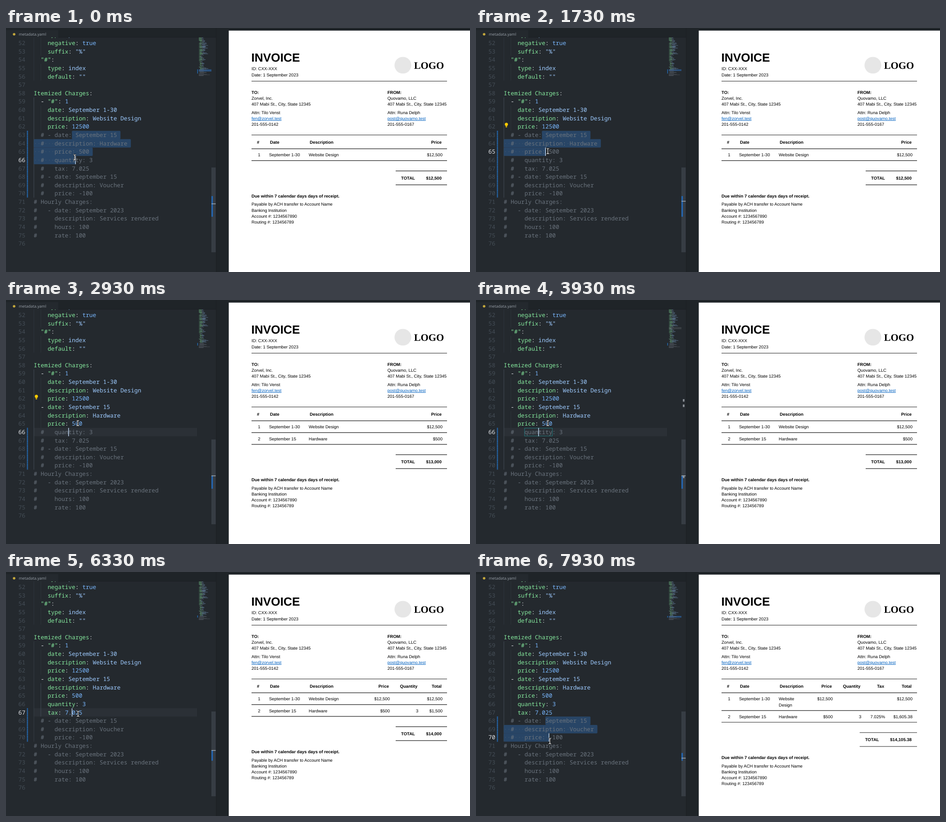
Animation of 1030x544 px, one loop 8000 ms. Source, as an HTML page:

```html
<!DOCTYPE html>
<html lang="en">
<head>
<meta charset="utf-8">
<title>Invoice from YAML</title>
<style>
  html, body { margin: 0; width: 100%; height: 100%; overflow: hidden; background: #24292e; }
  svg { display: block; width: 1030px; height: 544px; }
  text { white-space: pre; text-rendering: geometricPrecision; }
  .code text { font: 500 12.833px "Noto Sans Mono", monospace; }
  .code .tab { font: 8.6px "Noto Sans", sans-serif; fill: #959da5; }
  .page text { font: 9.56px "Liberation Sans", Arial, sans-serif; fill: #000; }
  .page .bold { font-weight: bold; }
  .page .title { font-size: 26.3px; font-weight: bold; }
  .page .logo { font: bold 22.2px "Liberation Serif", serif; }
  .page .link { fill: #0563c1; text-decoration: underline; }
</style>
</head>
<body>
<svg id="stage" viewBox="0 0 1030 544"></svg>
<script>
const LOOP = 8000, LEFT = 61.6, CHAR = 7.7, PITCH = 18.63, FIRST_ROW = 51;
const COLOR = {
  key: '#85e89d', string: '#9ecbff', number: '#79b8ff', plain: '#e1e4e8',
  comment: '#6a737d', dot: '#41566e', guide: '#2f363d', blue: '#2470bd'
};

const SOURCE = `    type: percent
    negative: true
    suffix: "%"
  "#":
    type: index
    default: ""

Itemized Charges:
  - "#": 1
    date: September 1-30
    description: Website Design
    price: 12500
  - date: September 15
    description: Hardware
    price: 500
    quantity: 3
    tax: 7.025
  - date: September 15
    description: Voucher
    price: -100
# Hourly Charges:
#   - date: September 2023
#     description: Services rendered
#     hours: 100
#     rate: 100
`.split('\n');

// time, caret row, caret column, selection anchor row and column
const CARET = [
  [0, 66, 12, 63, 11], [1730, 65, 12, 63, 11], [2400, 65, 10, 63, 9],
  [2870, 66, 10], [4270, 66, 8], [5530, 67, 13], [6330, 67, 11]
];
const DRAG_START = 7470;
const CARET_OFF = [[800, 1270], [2200, 2400], [3400, 3930], [4730, 5200], [6070, 6330], [6800, 7330]];
const MOUSE = [
  [0, 152.5, 288.5], [200, 152, 287.5], [400, 152, 287.5], [530, 154, 284],
  [670, 166, 277], [800, 162, 274], [866, 159.5, 274.5], [5070, 159.5, 274.5],
  [5133, 159.5, 280], [5200, 160, 306], [5266, 160, 316], [7130, 160, 316],
  [7200, 160, 317], [7400, 156, 331], [7530, 156, 333], [7670, 157, 347], [7930, 164, 377]
];

const colX = col => LEFT + col * CHAR;
const rowY = row => 285.1 + (row - 66) * PITCH;
const rulerY = row => 392 + (row - 66) * 5.75;
const mapY = row => 20 + (row - 1) * 1.165;
const between = (t, a, b) => t >= a && t < b;
// value of the last [time, value] step reached
const stepAt = (t, steps) => steps.filter(s => s[0] <= t).pop()[1];

const rect = (x, y, w, h, fill, extra = '') =>
  `<rect x="${x}" y="${y}" width="${w}" height="${h}" fill="${fill}" ${extra}/>`;
const line = (x1, y1, x2, y2, stroke, extra = '') =>
  `<path d="M${x1} ${y1}L${x2} ${y2}" stroke="${stroke}" ${extra}/>`;
const text = (x, y, str, extra = '') => `<text x="${x}" y="${y}" ${extra}>${str}</text>`;
const codeText = (row, col, str, fill) => text(colX(col), rowY(row) + 13.8, str, `fill="${fill}"`);

function tokens(str) {
  if (/^\s*#/.test(str)) {
    const indent = str.search(/#/);
    return [[indent, str.slice(indent), COLOR.comment]];
  }
  const match = str.match(/^(\s*)(- )?([^:]+):\s?(.*)$/);
  if (!match) return [];
  const [, indent, dash = '', key, value] = match;
  const start = indent.length + dash.length, colon = start + key.length;
  const isConst = /^(true|-?[\d.]+)$/.test(value);
  return [
    [indent.length, dash, COLOR.plain],
    [start, key, COLOR.key],
    [colon, ':', COLOR.plain],
    [colon + 2, value, isConst ? COLOR.number : COLOR.string]
  ].filter(token => token[1]);
}

// Plausible shapes for the lines scrolled out of view, shown only in the minimap
const HIDDEN = Array.from({ length: FIRST_ROW - 1 }, (_, i) => {
  const noise = k => Math.abs(Math.sin(i * 12.9 + k * 78.2) * 437.5) % 1;
  if (i % 13 === 9) return '';
  const indent = i < 6 ? 0 : 2 * (i % 3);
  return ' '.repeat(indent) + 'k'.repeat(4 + noise(1) * 8) + ': ' + 'v'.repeat(noise(2) * (i > 12 && i < 34 ? 20 : 9));
});

// The pointer moves in steps of a fifteenth of a second
function mouseAt(t) {
  const q = Math.floor((t + 4) * 0.015) / 0.015;
  const i = MOUSE.findIndex(m => m[0] > q);
  if (i < 0) return MOUSE[MOUSE.length - 1].slice(1);
  const [a, b] = [MOUSE[i - 1], MOUSE[i]], f = (q - a[0]) / (b[0] - a[0]);
  return [a[1] + (b[1] - a[1]) * f, a[2] + (b[2] - a[2]) * f];
}

function caretAt(t, [mx, my]) {
  if (t < DRAG_START) return CARET.filter(c => c[0] <= t).pop().slice(1);
  return [66 + Math.floor((my - rowY(66)) / PITCH), Math.round((mx - LEFT) / CHAR), 68, 12];
}

function editor(t) {
  const mouse = mouseAt(t);
  const [row, col, anchorRow = row, anchorCol = col] = caretAt(t, mouse);
  const hasSelection = anchorRow !== row || anchorCol !== col;
  const lastActive = stepAt(t, [[0, 62], [2400, 65], [4270, 66], [6330, 67]]);
  const dirty = stepAt(t, [[0, 63], [2600, 66], [4470, 67], [6530, 68]]);
  const lines = SOURCE.map((s, i) => {
    const n = i + FIRST_ROW;
    return n > lastActive && n >= 63 && n <= 70 ? '  # ' + s.slice(2) : s;
  });
  let out = rect(0, 0, 466, 544, '#24292e');

  if (!hasSelection) out += rect(LEFT, rowY(row), 424 - LEFT, PITCH, '#2b3036');

  const guide = (c, from, to, color = COLOR.guide) =>
    line(colX(c) + 0.3, rowY(from), colX(c) + 0.3, rowY(to + 1), color);
  out += guide(0, 51, 56) + guide(2, 51, 53) + guide(2, 55, 56) + guide(2, 60, 62);
  out += guide(0, 59, 70, row > lastActive ? '#444d56' : '#373e45');
  if (lastActive > 62) out += guide(2, 64, lastActive, row <= lastActive ? '#444d56' : COLOR.guide);

  let dots = '', mapSelection = '';
  if (hasSelection) {
    for (let n = anchorRow; n <= row; n++) {
      const str = lines[n - FIRST_ROW];
      const from = n === anchorRow ? anchorCol : 0, to = n === row ? col : str.length + 1;
      const spaces = [...str.slice(from, to)].map(c => c === ' ' ? '·' : ' ').join('');
      out += rect(colX(from), rowY(n), (to - from) * CHAR, PITCH + 0.1, '#284566', 'rx="2"');
      dots += codeText(n, from, spaces, COLOR.dot);
      mapSelection += rect(428, mapY(n), 28, 1.2, '#3392ff', 'opacity=".4"');
    }
  }

  const word = between(t, 3200, 4270) ? [66, 6, 8] : between(t, 5800, 6330) ? [67, 11, 5] : null;
  if (word) {
    out += rect(colX(word[1]), rowY(word[0]) + 0.5, word[2] * CHAR, PITCH - 1, 'none', 'stroke="#17e5e6" stroke-opacity=".42"');
  }

  lines.forEach((str, i) => {
    const n = i + FIRST_ROW;
    out += text(27.6, rowY(n) + 13.8, n, `fill="${n === row ? COLOR.plain : '#444d56'}"`);
    tokens(str).forEach(([c, s, fill]) => out += codeText(n, c, s, fill));
  });
  out += dots;

  out += line(47.6, rowY(dirty), 47.6, rowY(71), COLOR.blue, 'stroke-width="2.6" stroke-dasharray="1.5 .6"');
  if (!CARET_OFF.some(([a, b]) => between(t, a, b))) out += rect(colX(col) - 0.4, rowY(row), 1.4, PITCH, '#c8e1ff');
  if (between(t, 130, 3200)) {
    out += '<circle cx="67.4" cy="214.8" r="3.5" fill="#fc0"/>' + rect(65.7, 217, 3.4, 4.6, '#fc0', 'rx="1"')
      + line(65.8, 219.3, 69, 219.3, '#24292e', 'stroke-width=".7"');
  }

  // Minimap
  out += mapSelection;
  HIDDEN.concat(lines).forEach((str, i) => tokens(str).forEach(([c, s, fill]) => {
    out += rect(428 + c * 0.68, mapY(i + 1), s.length * 0.68, 0.8, fill, 'opacity=".5"');
  }));
  out += rect(424.7, mapY(dirty), 1.4, mapY(71) - mapY(dirty), COLOR.blue);

  // Overview ruler and scrollbar
  out += rect(456, 311, 9.5, 189, '#373d44');
  out += rect(456, rulerY(dirty), 3.2, rulerY(71) - rulerY(dirty), '#2467b4');
  if (word) {
    const marks = word[0] === 66 ? [221, 233, 391.5] : [398];
    marks.forEach(y => out += rect(459.2, y, 3.6, 5.6, '#8b9096'));
    if (word[0] === 66) out += [61.2, 63.5].map(y => rect(428, y, 28, 1, '#8b9096', 'opacity=".45"')).join('');
  }
  out += rect(456, rulerY(row) - 0.7, 9.5, 1.4, '#a9b4be');

  // Tab bar
  out += rect(0, 0, 466, 20.5, '#1f2428') + rect(0, 5, 116, 16, '#24292e')
    + line(116, 20.7, 466, 20.7, '#1b1f23') + '<circle cx="18" cy="14" r="2.8" fill="#c5a93c"/>'
    + text(28.5, 17.2, 'metadata.yaml', 'class="tab"');

  const beam = 'M-2.8-6Q0-6 0-4V4Q0 6-2.8 6M2.8-6Q0-6 0-4M0 4Q0 6 2.8 6';
  out += `<g transform="translate(${mouse})" fill="none"><path d="${beam}" stroke="#111" stroke-width="2.8"/>`
    + `<path d="${beam}" stroke="#fff" stroke-width="1.2"/></g>`;
  return `<g class="code">${out}</g>`;
}

function invoice(t) {
  const phase = stepAt(t, [[0, 0], [2470, 1], [4270, 2], [6400, 3]]);
  const wrapped = phase === 3;
  const columns = [
    { Price: 969 }, { Price: 969 },
    { Price: 852, Quantity: 915.3, Total: 969 },
    { Price: 792, Quantity: 855.3, Tax: 908, Total: 969 }
  ][phase];
  const rows = [
    { Date: 'September 1-30', Text: wrapped ? ['Website', 'Design'] : ['Website Design'], Price: '$12,500', Total: '$12,500' },
    { Date: 'September 15', Text: ['Hardware'], Price: '$500', Quantity: '3', Tax: '7.025%', Total: wrapped ? '$1,605.38' : '$1,500' }
  ].slice(0, phase ? 2 : 1);

  const put = (x, mid, str, cls = '', extra = '') => text(x, mid + 3.6, str, `class="${cls}" ${extra}`);
  const right = (x, mid, str, cls) => put(x, mid, str, cls, 'text-anchor="end"');
  const rule = (x, y) => line(x, y, 979, y, '#1a1a1a', 'stroke-width="1.2"');
  const party = (x, head, name, mail, phone, person) =>
    put(x, 143.2, head, 'bold') + put(x, 156.4, name) + put(x, 169.6, '407 Mabi St., City, State 12345')
    + put(x, 188, 'Attn: ' + person) + put(x, 201.2, mail, 'link') + put(x, 214.4, phone);

  let out = rect(466, 0, 564, 544, '#1f2428') + line(466.5, 0, 466.5, 544, '#1b1f23')
    + rect(494.5, 5.8, 535.5, 539, '#fff');
  out += text(544.5, 74.9, 'INVOICE', 'class="title"') + put(545, 90.7, 'ID: CXX-XXX') + put(545, 103.9, 'Date: 1 September 2023')
    + '<circle cx="881" cy="83" r="18.6" fill="#e6e6e6"/>' + text(905.8, 90.6, 'LOGO', 'class="logo"') + rule(545, 118.5);
  out += party(545, 'TO:', 'Zorvel, Inc.', 'fen@zorvel.test', '201-555-0142', 'Tilo Venst')
    + party(846.7, 'FROM:', 'Quovamo, LLC', 'post@quovamo.test', '201-555-0167', 'Runa Delph');

  out += rule(545, 238.5) + put(557, 254.2, '#', 'bold') + put(586, 254.2, 'Date', 'bold') + put(674.3, 254.2, 'Description', 'bold');
  for (const name in columns) out += right(columns[name] - 2, 254.2, name, 'bold');
  let y = 269.4;
  out += rule(545, y);
  rows.forEach((item, i) => {
    const mid = y + 13.3;
    out += put(559.3, mid, i + 1) + put(584, mid, item.Date);
    item.Text.forEach((s, k) => out += put(672, mid + k * 13.2, s));
    for (const name in columns) out += right(columns[name], mid, item[name] || '');
    y += 13 + item.Text.length * 13.2;
    out += rule(545, y);
  });

  const edge = wrapped ? 851.7 : 865;
  out += rule(edge, y + 23) + rule(edge, y + 54) + put(edge + 12, y + 38.8, 'TOTAL', 'bold')
    + right(967, y + 38.8, ['$12,500', '$13,000', '$14,000', '$14,105.38'][phase], 'bold');
  out += put(545, y + 78.8, 'Due within 7 calendar days days of receipt.', 'bold');
  ['Payable by ACH transfer to Account Name', 'Banking Institution', 'Account #: 1234567890', 'Routing #: 123456789']
    .forEach((s, i) => out += put(545, y + 97.2 + i * 13.2, s));
  return `<g class="page">${out}</g>`;
}

const stage = document.getElementById('stage');
let shown = '';
function frame() {
  const t = performance.now() % LOOP;
  const markup = editor(t) + invoice(t);
  if (markup !== shown) stage.innerHTML = shown = markup;
  requestAnimationFrame(frame);
}
frame();
</script>
</body>
</html>
```
